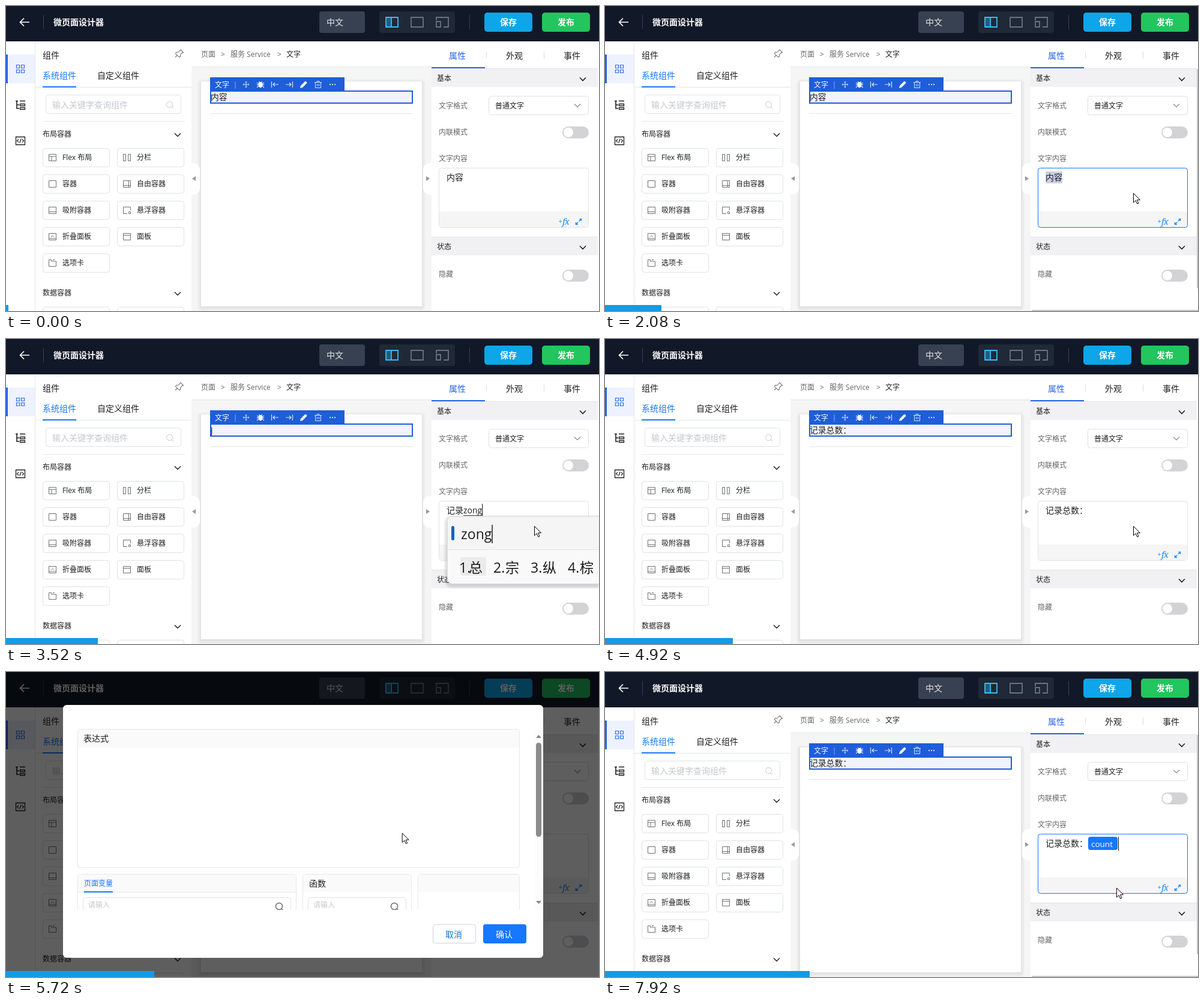
Recreate the animation shown at these times as an HTML page. Size 988x509 px, loop 8 s.

```html
<!DOCTYPE html>
<html lang="zh-CN">
<head>
<meta charset="utf-8">
<title>微页面设计器</title>
<style>
html, body { margin: 0; width: 100%; height: 100%; overflow: hidden; background: #fff; }
svg { display: block; width: 988px; height: 509px; font-family: "Open Sans", "Noto Sans CJK SC", "Noto Sans CJK", sans-serif; }
text { white-space: pre; }
</style>
</head>
<body>
<svg id="stage" viewBox="0 0 988 509"></svg>
<script>
const BLUE = '#1677ff', DEEP = '#1f5dd9', INK = '#1f1f1f', GREY = '#666', LINE = '#e4e6ea';

const rect = (x, y, w, h, fill, r = 0, stroke = 'none', sw = 1) =>
  `<rect x="${x}" y="${y}" width="${w}" height="${h}" rx="${r}" fill="${fill}" stroke="${stroke}" stroke-width="${sw}"/>`;
const frame = (x, y, w, h, stroke = '#dfe1e6', fill = '#fff', r = 4) =>
  rect(x + .5, y + .5, w - 1, h - 1, fill, r, stroke);
const path = (d, stroke, sw = 1, fill = 'none') =>
  `<path d="${d}" stroke="${stroke}" stroke-width="${sw}" fill="${fill}"/>`;
const circle = (x, y, r, fill, stroke = 'none', sw = 1) =>
  `<circle cx="${x}" cy="${y}" r="${r}" fill="${fill}" stroke="${stroke}" stroke-width="${sw}"/>`;
const at = (x, y, body) => `<g transform="translate(${x} ${y})">${body}</g>`;
// y is the middle of the line of text
const text = (x, y, s, size = 12, fill = INK, attrs = '') =>
  `<text x="${x}" y="${y + size * .37}" font-size="${size}" fill="${fill}" ${attrs}>${s}</text>`;
const chevron = (x, y, color = INK, sw = 1.4) => path(`M${x - 5} ${y - 2.5}l5 5 5-5`, color, sw);

const pen = document.createElement('canvas').getContext('2d');
function textWidth(s, size) {
  pen.font = size + 'px "Open Sans", "Noto Sans CJK SC", sans-serif';
  return pen.measureText(s).width;
}

function header() {
  const bold = 'font-weight="bold"';
  return rect(0, 0, 988, 59, '#111827')
    + path('M39 27H24M30 20.5L23.5 27l6.5 6.5', '#fff', 1.7)
    + path('M62.5 15v24M772.5 15v24', '#374151')
    + text(79, 27, '微页面设计器', 14, '#fff', bold)
    + rect(522, 9, 76, 36, '#374151', 4) + text(534, 27, '中文', 14, '#e5e7eb')
    + rect(622, 9, 126, 36, '#1f2937', 4)
    + rect(633, 19, 8, 16, '#1f5f80') + path('M633 19h20v16h-20zM642 19v16', '#38bdf8', 1.8)
    + path('M675 19h20v16h-20z', '#6b7280', 1.8)
    + path('M717 24v-5h20v16h-8M717 26h7v9h-7z', '#6b7280', 1.8)
    + rect(797, 11, 80, 32, '#0ea5e9', 5) + text(823, 27, '保存', 14, '#fff', bold)
    + rect(893, 11, 80, 32, '#22c55e', 5) + text(919, 27, '发布', 14, '#fff', bold);
}

function rail() {
  return rect(0, 59, 48, 450, '#fff') + rect(48, 59, 1, 450, LINE)
    + rect(0, 81, 48, 48, '#edf2fe') + rect(0, 81, 3, 48, '#2563eb')
    + path('M17.5 98.5h5v5h-5zM25.5 98.5h5v5h-5zM17.5 106.5h5v5h-5zM25.5 106.5h5v5h-5z', '#2f6bea', 1.2)
    + path('M16 158.5h4M18 158v13h4M18 165h4M23 158.5h9', INK, 1.6)
    + path('M23.5 163.5h8v3h-8zM23.5 169.5h8v3h-8z', INK, 1.3)
    + path('M16.5 218.5h15v13h-15zM21 222.5l-2.5 2.5 2.5 2.5M27 222.5l2.5 2.5-2.5 2.5M25.3 221.5l-2.6 7', INK, 1.3);
}

const BOX = 'M.5.5h12v11h-12z';
const COMPONENTS = [
  ['Flex 布局', BOX + 'M.5 4h12M5 4v7.5'], ['分栏', 'M.5.5h4v11h-4zM8.5.5h4v11h-4z'],
  ['容器', BOX], ['自由容器', BOX + 'M.5 8.5h12M9.5.5v11'],
  ['吸附容器', BOX + 'M.5 8.5h12'], ['悬浮容器', 'M7 11.5H.5V.5h12V6M9.5 8.5h3v3h-3z'],
  ['折叠面板', BOX + 'M4 6.5L6.5 4 9 6.5M.5 9h12'], ['面板', BOX + 'M.5 3.5h12'],
  ['选项卡', 'M.5.5h4v2.5h8v8.5h-12zM7 .5h3'],
];

function library() {
  const items = COMPONENTS.map(([name, icon], n) => {
    const x = 61 + n % 2 * 124, y = 237 + (n >> 1) * 44;
    return frame(x, y, 112, 32) + at(x + 10, y + 10, path(icon, '#707070')) + text(x + 33, y + 16, name);
  });
  return rect(49, 59, 260, 450, '#fff')
    + text(61, 82, '组件', 14)
    + path('M291 73l4.5 4.5-2 .6-3 3 .2 3-2.2 1.2-6-6 1.2-2.2 3 .2 3-3zM285 82.5l-3 3', '#777', 1.1)
    + text(61, 116, '系统组件', 14, BLUE) + text(152, 116, '自定义组件', 14)
    + rect(49, 135, 260, 1, LINE) + rect(61, 134, 56, 2, BLUE)
    + frame(66, 148, 226, 32) + text(77, 165, '输入关键字查询组件', 14, '#c4c7cc')
    + circle(272.5, 164.5, 5, 'none', '#c4c7cc') + path('M276 168l3 3', '#c4c7cc')
    + rect(61, 192, 237, 1, LINE)
    + text(61, 214, '布局容器') + chevron(286, 215)
    + items.join('')
    + text(61, 479, '数据容器') + chevron(286, 480)
    + frame(61, 502, 112, 32) + frame(185, 502, 112, 32);
}

function toolbar() {
  const w = '#dbe6ff';
  const icons = [
    path('M-5 0H5M0-5V5M-3.5-1.5L-5 0l1.5 1.5M3.5-1.5L5 0 3.5 1.5M-1.5-3.5L0-5l1.5 1.5M-1.5 3.5L0 5l1.5-1.5', w),
    path('M-6-3l4 2M6-3l-4 2M-6 .5H6M-6 5l4-3M6 5L2 2M-2.5-5l1 2M2.5-5l-1 2', w, 1.3) + '<ellipse rx="3.4" ry="4.8" cy=".5" fill="#fff"/>',
    path('M-5.5-5V5M6 0h-9M0-3l-3 3 3 3', w, 1.2),
    path('M5.5-5V5M-6 0h9M0-3l3 3-3 3', w, 1.2),
    path('M-6 6l1-4 7-7q1-1 2 0l1 1q1 1 0 2l-7 7z', 'none', 0, '#fff'),
    path('M-6-3.5H6M-2-3.5v-2h4v2M-4.5-3.5v9h9v-9M-1.5-1v4M1.5-1v4', w),
    [-4, 0, 4].map(x => circle(x, 0, 1.1, '#fff')).join(''),
  ];
  return rect(340, 119, 224, 23, DEEP) + text(348, 131.5, '文字', 12, '#fff') + path('M382 126v12', '#89abf0')
    + icons.map((icon, n) => at(400 + n * 24, 131, icon)).join('');
}

function canvasArea() {
  const shadow = [1, 2, 3, 4, 5, 6].map(n => rect(325 - n, 128 - n, 368 + 2 * n, 375 + 2 * n, 'rgba(0,0,0,.013)', n)).join('');
  return rect(309, 59, 400, 450, '#f5f5f6') + rect(309, 59, 400, 42, '#fff') + rect(309, 101, 400, 1, LINE)
    + text(325, 81, '页面', 12, GREY) + text(358, 81, '&gt;', 12, GREY) + text(374, 81, '服务 Service', 12, GREY)
    + text(452, 81, '&gt;', 12, GREY) + text(467, 81, '文字')
    + shadow + rect(325, 126, 368, 375, '#fff')
    + rect(341, 142, 336, 20, '#f1f4fd', 0, DEEP, 2) + toolbar() + rect(340, 179, 338, 1, LINE)
    + path('M309 262q14 0 14 12v29q0 12-14 12z', 'none', 0, '#fff') + path('M316 284v8l-6-4z', 'none', 0, '#999')
    + path('M709 262q-14 0-14 12v29q0 12 14 12z', 'none', 0, '#fff') + path('M700 284v8l6-4z', 'none', 0, '#999');
}

const toggle = y => rect(927, y, 44, 20, '#d3d3d6', 10) + circle(937, y + 10, 8, '#fff');
const section = (y, h, name) => rect(709, y, 277, h, '#f1f1f3') + rect(709, y, 277, 1, '#e3e3e6')
  + text(718, y + 17, name) + chevron(961, y + 18, INK, 1.6);

function properties() {
  return rect(709, 59, 279, 450, '#fff')
    + text(738, 83, '属性', 14, '#2563eb') + text(833, 83, '外观', 14) + text(929, 83, '事件', 14)
    + path('M800.5 76v12M896.5 76v12', '#ddd')
    + section(104, 31, '基本') + rect(709, 102, 89, 2, '#2563eb')
    + text(721, 167, '文字格式', 12, GREY) + frame(804, 150, 167, 32) + text(815, 167, '普通文字') + chevron(952, 166, '#888', 1.2)
    + text(721, 211, '内联模式', 12, GREY) + toggle(201)
    + text(721, 255, '文字内容', 12, GREY)
    + section(385, 31, '状态')
    + text(721, 448, '隐藏', 12, GREY) + toggle(440);
}

const PAGE = header() + rail() + library() + canvasArea() + properties();

// [first step, committed text, pinyin being composed]
const TYPING = [
  [0, '内容', ''], [22, '', 'j'], [24, '', 'ji'], [25, '', 'jil'], [27, '', 'jilu'], [30, '记录', ''],
  [32, '记录', 'z'], [33, '记录', 'zo'], [34, '记录', 'zon'], [35, '记录', 'zong'], [37, '记录', 'zongs'],
  [38, '记录', 'zongsh'], [39, '记录', 'zongshu'], [41, '记录总数', ''], [43, '记录总数：', ''],
];
const CANDIDATES = {
  j: '就 将 及 即', ji: '及 几 即 级', jil: '记录 激励 吉利', jilu: '记录 纪录 几路',
  z: '在 中 这 最', zo: '走 做 坐 左', zon: '总 宗 纵 棕', zong: '总 宗 纵 棕',
  zongs: '总是 总数 总算', zongsh: '总是 总数 宗室', zongshu: '总数 棕树 总书',
};

function textarea(i, done, pinyin) {
  const active = i >= 5 && i < 22 || i >= 50 && i < 54 || i >= 77;
  let s = frame(721, 270, 250, 100, '#e0e2e7') + rect(722, 343, 248, 26, '#f5f5f5', 3)
    + (active ? frame(721, 270, 250, 100, BLUE, 'none') + rect(986, 105, 2, 366, '#c9c9c9') + rect(711, 507, 277, 2, '#c9c9c9') : '')
    + text(920.5, 359, '+', 11, '#1890ff') + text(927, 359, 'fx', 15, '#1890ff', 'font-style="italic" style="font-family:Noto Serif,serif" letter-spacing="-1"')
    + path('M949.5 361v3.5h3.5M955.5 355.5h3v3M950 364l3.3-3.3M954.7 359.3l3.3-3.3', '#1890ff', 1.6);
  if (i >= 14 && i < 22) s += rect(734, 276, 28, 20, '#cbd0e6');
  s += text(734, 286, done + pinyin, 14);
  if (pinyin) {
    const x = 734 + textWidth(done, 14), end = x + textWidth(pinyin, 14);
    s += rect(x, 294, end - x, 1, '#444') + rect(end, 275, 1, 20, '#000');
  }
  if (i >= 75) s += rect(805, 275, 49, 22, BLUE, 4) + text(810, 287, 'count', 13.5, '#fff') + rect(855, 275, 1, 23, '#000');
  return s;
}

function inputMethod(pinyin) {
  let s = '';
  for (let n = 6; n; n--) s += rect(735 - n, 299 - n, 270, 112 + 2 * n, 'rgba(0,0,0,.022)', 8 + n);
  s += rect(735.5, 296.5, 270, 112, '#f9f9f9', 8, '#dedede') + rect(736, 297, 260, 55, '#f5f5f6', 7) + rect(736, 351, 260, 1, '#e2e2e2')
    + rect(742, 312, 5, 24, '#0a66bd', 2.5) + text(758, 325, pinyin, 23, '#1b1b1b')
    + rect(758 + textWidth(pinyin, 23), 310, 1.3, 31, '#000');
  let x = 758;
  CANDIDATES[pinyin].split(' ').forEach((word, n) => {
    const extra = (word.length - 1) * 23;
    if (!n) s += rect(757, 364, 43 + extra, 31, '#ebebec', 3);
    s += text(x - 3, 381, n + 1 + '.', 23, '#1b1b1b') + text(x + (n ? 17 : 13), 381, word, 23, '#1b1b1b');
    x += (n ? 62 : 57) + extra;
  });
  return s;
}

function dialog(i) {
  const typed = 'count'.slice(0, [64, 65, 67, 68, 69].filter(n => i >= n).length);
  const card = (x, w) => frame(x, 337, w, 90, '#e8e8e8') + rect(x + 1, 338, w - 2, 29, '#fafafa', 3);
  const search = (x, w) => frame(x, 376, w, 32) + text(x + 9, 389, '请输入', 12, '#c8c8c8')
    + circle(x + w - 20, 391, 5.5, 'none', '#666', 1.4) + path(`M${x + w - 16} 395l3 3`, '#666', 1.4);
  return rect(95, 55, 800, 422, '#fff', 6)
    + frame(119, 95, 737, 232, '#e8e8e8') + rect(120, 96, 735, 30, '#fafafa', 3) + text(129, 111, '表达式', 14)
    + text(129, 147, typed, 11.7, '#000', 'style="font-family:Liberation Mono,monospace"')
    + (i < 57 ? rect(126, 134, 1, 6, '#000') : i > 60 ? rect(129 + typed.length * 7.02, 136, 1, 21, '#000') : '')
    + '<clipPath id="pane"><rect x="95" y="55" width="800" height="342"/></clipPath><g clip-path="url(#pane)">'
    + card(119, 365) + rect(120, 367, 363, 1, '#e8e8e8') + text(130, 353, '页面变量', 12, BLUE) + rect(130, 366, 48, 2, BLUE) + search(128, 347)
    + card(494, 182) + text(505, 353, '函数', 14) + search(503, 164)
    + card(686, 170) + '</g>'
    + rect(880, 97, 14, 300, '#fcfcfc') + rect(883, 118, 9, 157, '#8b8b8b', 4.5)
    + path('M883 110l4.5-5 4.5 5zM883 382l4.5 5 4.5-5z', 'none', 0, '#858585')
    + frame(711, 421, 72, 32, '#cfd3da') + text(732, 438, '取消', 14, '#1671d8')
    + rect(795, 421, 72, 32, BLUE, 4) + text(816, 438, '确认', 14, '#fff', 'font-weight="500"');
}

// [scale, opacity, backdrop]
const FADE = { 54: [.65, .35, .12], 55: [.8, .75, .28], 56: [.95, .95, .5], 75: [.92, .6, .35] };

function modal(i) {
  if (i < 54 || i > 75) return '';
  const [scale, opacity, shade] = FADE[i] || [1, 1, .63];
  return rect(0, 0, 988, 509, `rgba(0,0,0,${shade})`)
    + `<g opacity="${opacity}" transform="translate(495 -109) scale(${scale}) translate(-495 109)">${dialog(i)}</g>`;
}

// [step, x, y]
const POINTER = [
  [3, 984, 400], [6, 860, 330], [10, 766, 290], [13, 766, 290], [17, 880, 312], [49, 880, 312], [52, 929, 360], [53, 929, 360],
  [55, 811, 330], [60, 381, 155], [71, 381, 155], [74, 830, 438], [75, 830, 438], [78, 852, 360], [80, 852, 360],
];

function pointer(i) {
  if (i < POINTER[0][0]) return '';
  const n = POINTER.findIndex(p => p[0] > i), a = POINTER[n - 1], b = POINTER[n];
  const u = (i - a[0]) / (b[0] - a[0]), e = u * u * (3 - 2 * u);
  const x = a[1] + (b[1] - a[1]) * e, y = a[2] + (b[2] - a[2]) * e;
  const beam = 'M-4.5-8h3.5l1 1 1-1h3.5M-4.5 8h3.5l1-1 1 1h3.5M0-7V7';
  return at(x, y, i >= 59 && i < 73
    ? path(beam, '#000', 3.4) + path(beam, '#fff', 1)
    : path('M.5.5v15.5l3.7-3.4 2.5 5.6 2.3-1-2.5-5.5h5z', '#000', 1, '#fff'));
}

function scene(i) {
  const [, done, pinyin] = TYPING.filter(k => k[0] <= i).pop();
  const shown = i < 28 ? '内容' : i < 41 ? 'j' : done;
  return PAGE + text(341, 152, shown, 13.8) + textarea(i, done, pinyin)
    + (pinyin ? inputMethod(pinyin) : '') + modal(i) + pointer(i)
    + rect(0, 499, Math.round(4 + i * 4.266), 10, '#139be8');
}

const stage = document.getElementById('stage'), start = performance.now();
let last = -1;
function tick() {
  const i = Math.min(79, Math.floor(((performance.now() - start) % 8000 + 20) / 100));
  if (i !== last) stage.innerHTML = scene(last = i);
  requestAnimationFrame(tick);
}
tick();
</script>
</body>
</html>
```
